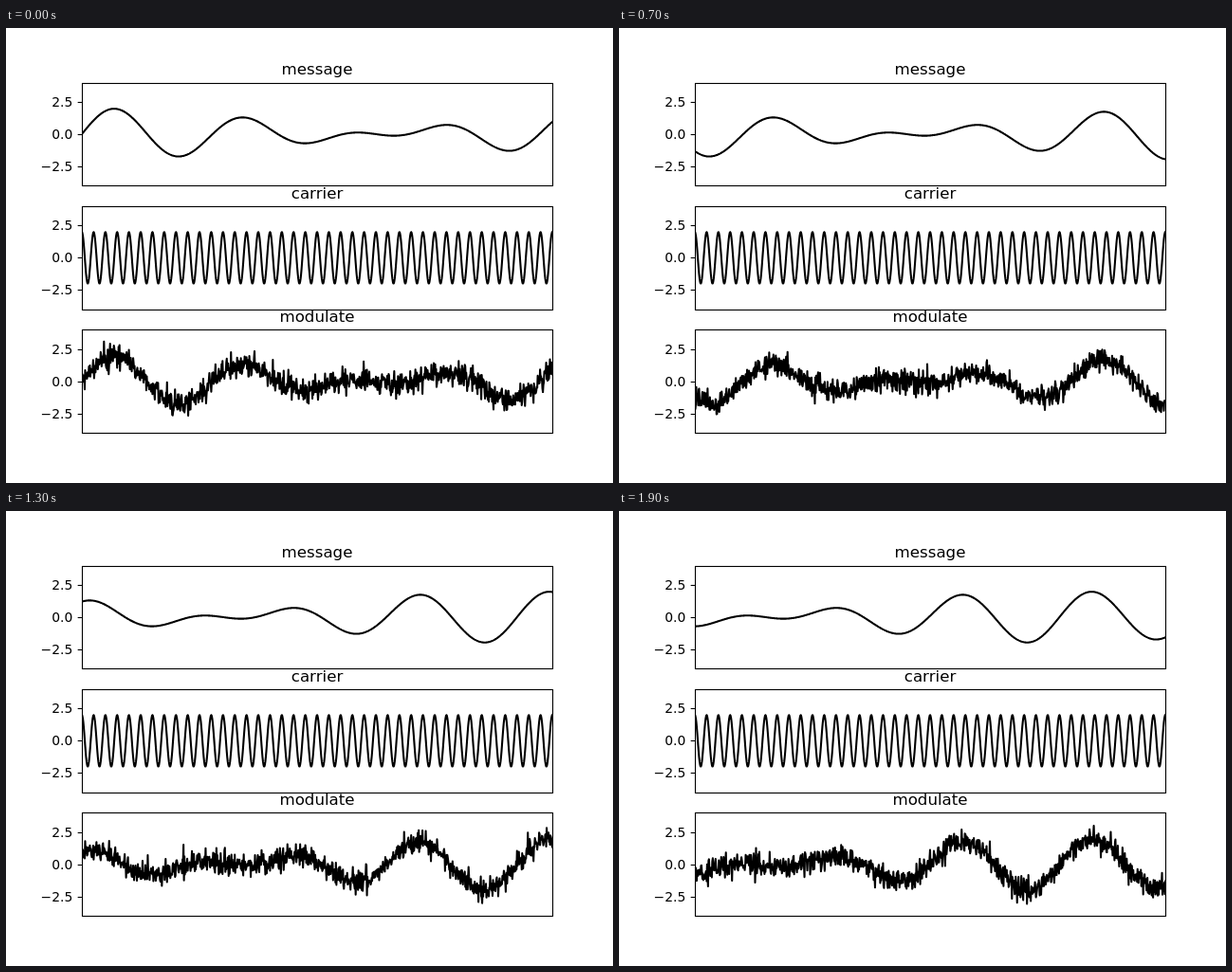
These frames come from a looping animation (640x480 px, 2000 ms). An HTML page:

```html
<!DOCTYPE html>
<html lang="en">
<head>
<meta charset="utf-8">
<title>Message, carrier, modulate</title>
<style>
  html, body { margin: 0; width: 100%; height: 100%; overflow: hidden; background: #fff; }
  svg { display: block; }
  text { font-family: "DejaVu Sans", sans-serif; fill: #000; }
  .title { font-size: 16.667px; text-anchor: middle; }
  .label { font-size: 13.889px; text-anchor: end; }
  .axis { fill: none; stroke: #000; stroke-width: 1.11; }
  .curve { fill: none; stroke: #000; stroke-width: 2.083; stroke-linejoin: round; stroke-linecap: square; }
</style>
</head>
<body>
<svg id="stage" width="640" height="480" viewBox="0 0 640 480"></svg>
<script>
const LEFT = 80, RIGHT = 576, HEIGHT = 108.706, PITCH = 130.447, FIRST_TOP = 57.6;
const SPAN = 40, SAMPLES = 1000, Y_LIMIT = 4;
const STEP_MS = 100, STEPS = 20, NOISE = 0.45;
const TAU = 2 * Math.PI;
const stage = document.getElementById("stage");

function add(tag, attributes, parent = stage) {
  const node = document.createElementNS("http://www.w3.org/2000/svg", tag);
  for (const key in attributes) node.setAttribute(key, attributes[key]);
  return parent.appendChild(node);
}

function addText(className, x, y, content) {
  add("text", { class: className, x, y }).textContent = content;
}

// Centre of the nearest pixel, for crisp axis lines
const snap = v => Math.floor(v + 0.5) + 0.5;

// Draws the axes and returns a function that plots y(x) for x from 0 to SPAN
function makePanel(title, index) {
  const top = FIRST_TOP + index * PITCH;
  const middle = top + HEIGHT / 2;
  const scale = HEIGHT / (2 * Y_LIMIT);
  const [y0, y1] = [snap(top), snap(top + HEIGHT)];

  const clip = add("clipPath", { id: "clip" + index });
  add("rect", { x: LEFT, y: y0 - 0.5, width: RIGHT - LEFT, height: y1 - y0 }, clip);
  const group = add("g", { "clip-path": `url(#clip${index})` });
  const curve = add("path", { class: "curve" }, group);

  add("rect", { class: "axis", x: LEFT + 0.5, y: y0, width: RIGHT - LEFT, height: y1 - y0 });
  for (const value of [2.5, 0, -2.5]) {
    const y = middle - value * scale;
    add("path", { class: "axis", d: `M${LEFT + 0.5} ${snap(y)}h-4.86` });
    addText("label", 70.3, Math.round(y + 5.06), value.toFixed(1).replace("-", "\u2212"));
  }
  addText("title", (LEFT + RIGHT) / 2, Math.round(top - 8.33), title);

  return f => {
    const points = [];
    for (let i = 0; i <= SAMPLES; i++) {
      const u = i / SAMPLES;
      const x = LEFT + u * (RIGHT - LEFT);
      points.push(x.toFixed(2) + " " + (middle - f(u * SPAN) * scale).toFixed(2));
    }
    curve.setAttribute("d", "M" + points.join("L"));
  };
}

// Seeded uniform generator
function makeRandom(seed) {
  return () => {
    seed = (seed + 0x6D2B79F5) | 0;
    let t = Math.imul(seed ^ (seed >>> 15), 1 | seed);
    t = (t + Math.imul(t ^ (t >>> 7), 61 | t)) ^ t;
    return ((t ^ (t >>> 14)) >>> 0) / 4294967296;
  };
}

const gaussian = random =>
  Math.sqrt(-2 * Math.log(1 - random())) * Math.cos(TAU * random());

const message = x => Math.sin(TAU * 0.1 * x) + Math.sin(TAU * 0.08 * x);
const carrier = x => 2 * Math.cos(TAU * x);

const [plotMessage, plotCarrier, plotModulate] =
  ["message", "carrier", "modulate"].map(makePanel);
plotCarrier(carrier);

let shown = -1;
const start = performance.now();

function draw() {
  const step = Math.floor((performance.now() - start) / STEP_MS) % STEPS;
  if (step !== shown) {
    shown = step;
    const random = makeRandom(1000 + step * 7919);
    plotMessage(x => message(x + step));
    plotModulate(x => message(x + step) + NOISE * gaussian(random));
  }
  requestAnimationFrame(draw);
}
draw();
</script>
</body>
</html>
```
